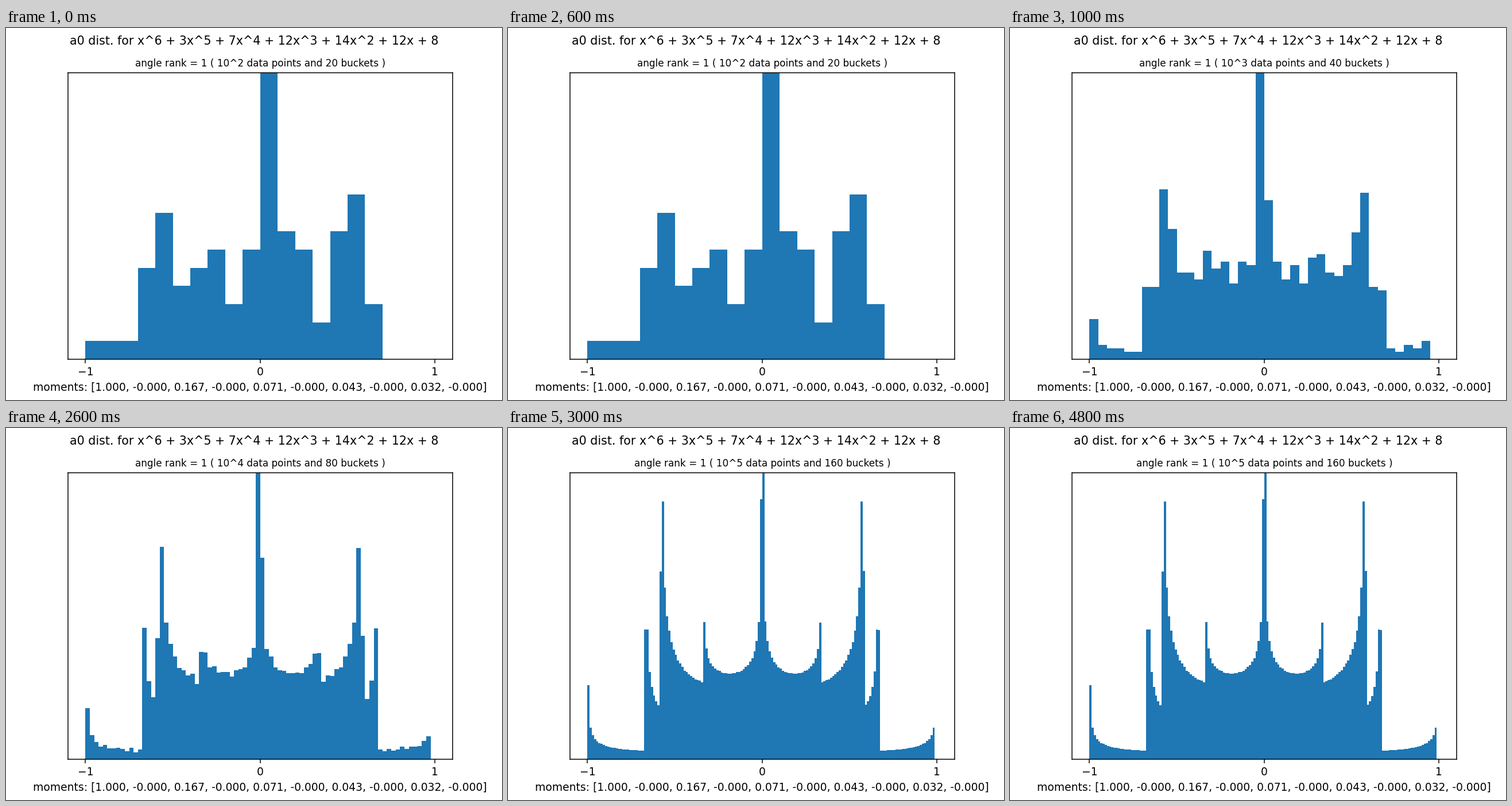
Write a matplotlib script that moves like this. It is 864x648 px and loops after 6000 ms.

```python
import numpy as np
import matplotlib.pyplot as plt
from matplotlib.animation import FuncAnimation

# The Weil polynomial has Frobenius angles pi/2, theta and theta + pi/3.
COEFFS = [1, 3, 7, 12, 14, 12, 8]
THETA = np.arccos((np.sqrt(5) - 3) / 2 / (2 * np.sqrt(2)))
STAGES = [2, 3, 4, 5]
LAST = len(STAGES) - 1


def normalized_traces(count):
    """Average cosine of the angles for the powers 1..count."""
    r = np.arange(1, count + 1)
    pair = 2 * np.cos((r % 12) * np.pi / 6) * np.cos(r * (THETA + np.pi / 6))
    return np.round((np.cos((r % 4) * np.pi / 2) + pair) / 3, 12)


def polynomial_text(coeffs):
    degree = len(coeffs) - 1
    terms = []
    for i, c in enumerate(coeffs):
        power = degree - i
        factor = str(c) if c != 1 or power == 0 else ""
        variable = "" if power == 0 else "x" if power == 1 else f"x^{power}"
        terms.append(factor + variable)
    return " + ".join(terms)


traces = normalized_traces(10 ** STAGES[-1])
moments = "1.000, -0.000, 0.167, -0.000, 0.071, -0.000, 0.043, -0.000, 0.032, -0.000"

plt.rcParams["font.family"] = "DejaVu Sans"
fig, ax = plt.subplots(figsize=(6.4, 4.8), dpi=135)
fig.suptitle(f"a0 dist. for {polynomial_text(COEFFS)}", fontsize=11)


def draw(frame):
    exponent = STAGES[min(frame, LAST)]
    buckets = 5 * 2 ** exponent
    ax.clear()
    ax.hist(traces[:10 ** exponent], bins=np.arange(-1, 1, 2 / buckets),
            density=True, color="#1f77b4")
    ax.set(xlim=(-1.1, 1.1), ylim=(0, 1.6), xticks=[-1, 0, 1], yticks=[])
    ax.set_title(f"angle rank = 1 ( 10^{exponent} data points "
                 f"and {buckets} buckets )", fontsize=9)
    ax.set_xlabel(f"moments: [{moments}]", fontsize=10)
    return ax.patches


anim = FuncAnimation(fig, draw, frames=6, interval=1000, init_func=lambda: [],
                     repeat=True, repeat_delay=0)
plt.show()
```
